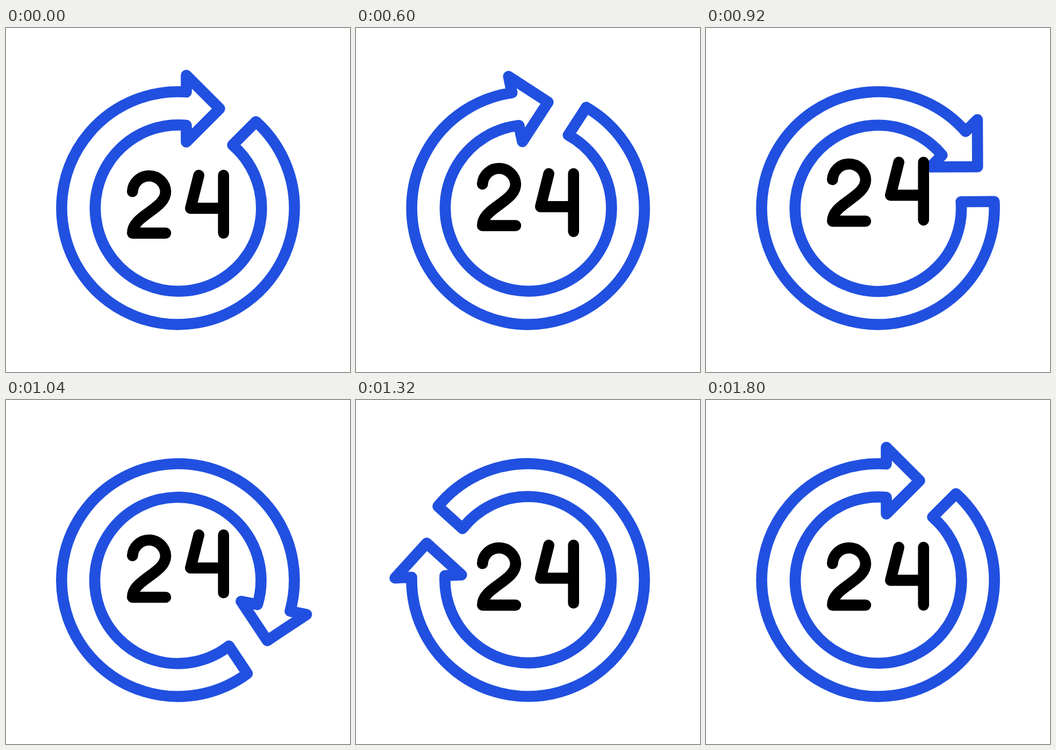
These frames come from a looping animation (640x640 px, 1.84 s). An HTML page:

```html
<!DOCTYPE html>
<html>
<head>
<meta charset="utf-8">
<style>
html, body { margin: 0; width: 100%; height: 100%; overflow: hidden; background: #fff; }
svg { display: block; width: 100%; height: 100%; }
path { fill: none; stroke: #000; stroke-width: 20.6; stroke-linecap: round; stroke-linejoin: round; }
#ring { stroke: #2150e0; }
</style>
</head>
<body>
<svg viewBox="0 0 640 640">
  <path id="ring" d="M335.5 88 L397.5 150 L335.5 212 V181.1 A154.7 154.7 0 1 0 421.5 217.8 L465 174.2 A216.5 216.5 0 1 1 335.5 119.1 Z"/>
  <path id="two" d="M235.3 304.3 A30.9 30.9 0 0 1 297 304.3 C297 320 284 330 266 343 S235.3 366 235.3 381.6 H297"/>
  <path id="four" d="M358.7 274 L343.3 335.4 H404.7 M404.7 274 V381.6"/>
</svg>
<script>
const LOOP = 1840, STEP = 40;
const [ring, two, four] = ['ring', 'two', 'four'].map(id => document.getElementById(id));

const progress = (t, from, to) => Math.min(1, Math.max(0, (t - from) / (to - from)));
const smooth = s => s * s * (3 - 2 * s);
const ease = (t, from, to) => smooth(progress(t, from, to));

// Cubic Bezier easing with control points (x1, 0) and (x2, 1)
function bezier(u, x1, x2) {
  let lo = 0, hi = 1;
  for (let i = 0; i < 30; i++) {
    const s = (lo + hi) / 2, r = 1 - s;
    if (3 * x1 * s * r * r + 3 * x2 * s * s * r + s * s * s < u) lo = s;
    else hi = s;
  }
  return smooth(lo);
}

// Wind back, spin once, then settle
const angle = t => -12 * ease(t, 40, 580)
  + 373.5 * bezier(progress(t, 600, 1720), 0.471, 0.534)
  - 1.5 * ease(t, 1720, 1800);

const hop = (t, start, top, end) => -24.8 * (ease(t, start, top) - ease(t, top, end));

function draw(now) {
  const t = Math.floor(now % LOOP / STEP) * STEP;
  ring.setAttribute('transform', `rotate(${angle(t)} 320 335)`);
  two.setAttribute('transform', `translate(0 ${hop(t, 340, 820, 1320)})`);
  four.setAttribute('transform', `translate(0 ${hop(t, 500, 960, 1440)})`);
}

const start = performance.now();
function tick() {
  draw(performance.now() - start);
  requestAnimationFrame(tick);
}
tick();
</script>
</body>
</html>
```
